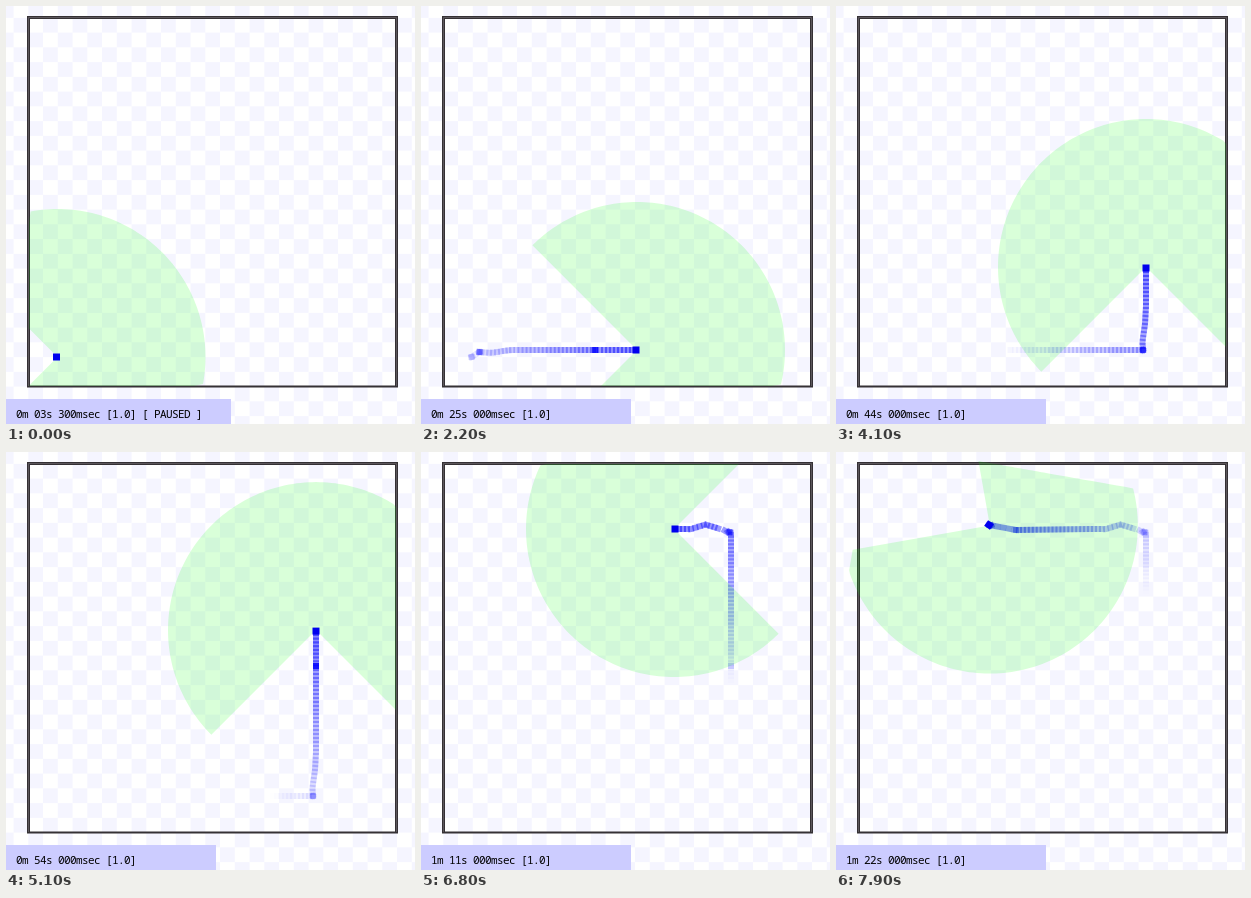
Recreate the animation shown at these times as an HTML page. Size 409 by 418 pixels, loop 8000 ms.

```html
<!DOCTYPE html>
<html lang="en">
<head>
<meta charset="utf-8">
<title>Wandering robot</title>
<style>
  html, body { margin: 0; width: 100%; height: 100%; overflow: hidden; background: #fff; }
  svg { display: block; }
  text { font: 11px "Noto Sans Mono", "DejaVu Sans Mono", monospace; letter-spacing: -0.6px; white-space: pre; }
</style>
</head>
<body>
<svg width="409" height="418" viewBox="0 0 409 418">
  <defs>
    <pattern id="floor" x="22.3" y="380.6" width="29.5" height="29.5" patternUnits="userSpaceOnUse">
      <rect width="29.5" height="29.5" fill="#fff"/>
      <path d="M0 0h14.75v14.75H0zM14.75 14.75h14.75v14.75h-14.75z" fill="#f5f5ff" shape-rendering="crispEdges"/>
    </pattern>
  </defs>
  <rect width="409" height="418" fill="url(#floor)"/>
  <g fill="none" stroke="#353135">
    <path d="M22.5 381V11.5H390.5V381" stroke-width="3"/>
    <path d="M21 380.4H392" stroke-width="2"/>
    <path d="M22.5 380V11.5H390.5V380" stroke="#5c575c"/>
  </g>
  <g id="trail" fill="#00f"></g>
  <path id="laser" fill="#0f0" fill-opacity=".15"/>
  <rect id="robot" x="-3.5" y="-3.5" width="7" height="7" fill="#0000ee"/>
  <rect id="bar" y="393" height="25" fill="#ccccff"/>
  <text id="status" x="10" y="412"></text>
</svg>
<script>
const $ = id => document.getElementById(id);
const STEP = 100, STEPS = 80;
const RANGE = 148, ROOM = { left: 23, right: 390, top: 12, bottom: 380 };
const TRAIL_LIFE = 24, TRAIL_GAP = 0.4;

// Route: second, x, y, heading in degrees (counter-clockwise)
const route = [
  [0, 50.5, 351, 0], [1.5, 50.5, 351, 32], [2.5, 58.5, 346, 32], [3.2, 58.5, 346, -5],
  [5, 58.5, 346, -5], [6.2, 70, 347, -5], [7.4, 82, 345, 8], [8.4, 91, 344, 0],
  [9, 97.5, 344, 0], [16.6, 174, 344, 0], [17.9, 174, 344, 0], [22, 215, 344, 0],
  [31.2, 307, 344, 0], [32.3, 307, 344, 95], [32.8, 307, 344, 95], [33.7, 306.5, 335, 82],
  [35.4, 309, 318, 84], [37.2, 310, 300, 90], [41, 310, 262, 90], [45.8, 310, 214, 90],
  [47.3, 310, 214, 90], [61.4, 310, 81, 90], [61.9, 309, 80.5, 90], [62, 308.7, 80, 80],
  [62.2, 309, 80.5, 80], [63.1, 306, 79.5, 145], [63.4, 299, 77, 160], [64.8, 286, 73, 165],
  [65.2, 283, 73, 195], [66.4, 270, 77, 188], [66.8, 266, 77, 180], [68, 254, 77, 180],
  [75.5, 180, 78, 180], [75.9, 180, 78, 170], [77.6, 156, 73.5, 170], [79, 153, 73, -35]
];

function poseAt(s) {
  const i = route.findIndex(key => key[0] > s);
  if (i === 0) return route[0].slice(1);
  if (i < 0) return route[route.length - 1].slice(1);
  const a = route[i - 1], b = route[i], u = (s - a[0]) / (b[0] - a[0]);
  return [1, 2, 3].map(n => a[n] + (b[n] - a[n]) * u);
}

const place = ([x, y, heading]) => `translate(${x} ${y}) rotate(${-heading})`;

const marks = Array.from({ length: TRAIL_LIFE / TRAIL_GAP }, () => {
  const mark = document.createElementNS("http://www.w3.org/2000/svg", "rect");
  for (const [k, v] of Object.entries({ x: -3, y: -3, width: 6, height: 6 })) mark.setAttribute(k, v);
  return $("trail").appendChild(mark);
});

function drawTrail(s) {
  const newest = Math.floor(s / TRAIL_GAP);
  marks.forEach((mark, i) => {
    const born = (newest - i) * TRAIL_GAP;
    mark.setAttribute("transform", place(poseAt(born)));
    mark.setAttribute("opacity", born < -2 ? 0 : Math.max(0, 0.48 * (1 - (s - born) / TRAIL_LIFE)));
  });
}

function rayLength(x, y, dx, dy) {
  const toX = dx > 0 ? (ROOM.right - x) / dx : dx < 0 ? (ROOM.left - x) / dx : Infinity;
  const toY = dy > 0 ? (ROOM.bottom - y) / dy : dy < 0 ? (ROOM.top - y) / dy : Infinity;
  return Math.min(RANGE, toX, toY);
}

// The scan lags one update behind the body, so it tilts while turning.
function laserPath(s) {
  const [x, y, heading] = poseAt(s);
  const lag = Math.max(-10, Math.min(10, poseAt(s - 0.1)[2] - heading));
  const rad = Math.PI / 180;
  const cx = x + Math.cos(heading * rad), cy = y - Math.sin(heading * rad);
  let d = `M${cx} ${cy}`;
  for (let a = -135; a <= 135; a += 1.5) {
    const seen = (heading + lag + a) * rad, shown = (heading + a) * rad;
    const r = rayLength(cx, cy, Math.cos(seen), -Math.sin(seen));
    d += `L${(cx + r * Math.cos(shown)).toFixed(2)} ${(cy - r * Math.sin(shown)).toFixed(2)}`;
  }
  return d + "Z";
}

function clock(s) {
  const total = s + 3, sec = String(total % 60).padStart(2, "0");
  const ms = s ? "000" : "300";
  return `${Math.floor(total / 60)}m ${sec}s ${ms}msec [1.0]${s ? "" : " [ PAUSED ]"}`;
}

function draw(s) {
  drawTrail(s);
  $("laser").setAttribute("d", laserPath(s));
  $("robot").setAttribute("transform", place(poseAt(s)));
  $("bar").setAttribute("width", s ? 210 : 225);
  $("status").textContent = clock(s);
}

let start, shown = 0;
function tick(now) {
  start ??= now;
  const s = Math.floor((now - start) / STEP) % STEPS;
  if (s !== shown) draw(shown = s);
  requestAnimationFrame(tick);
}
draw(0);
requestAnimationFrame(tick);
</script>
</body>
</html>
```
